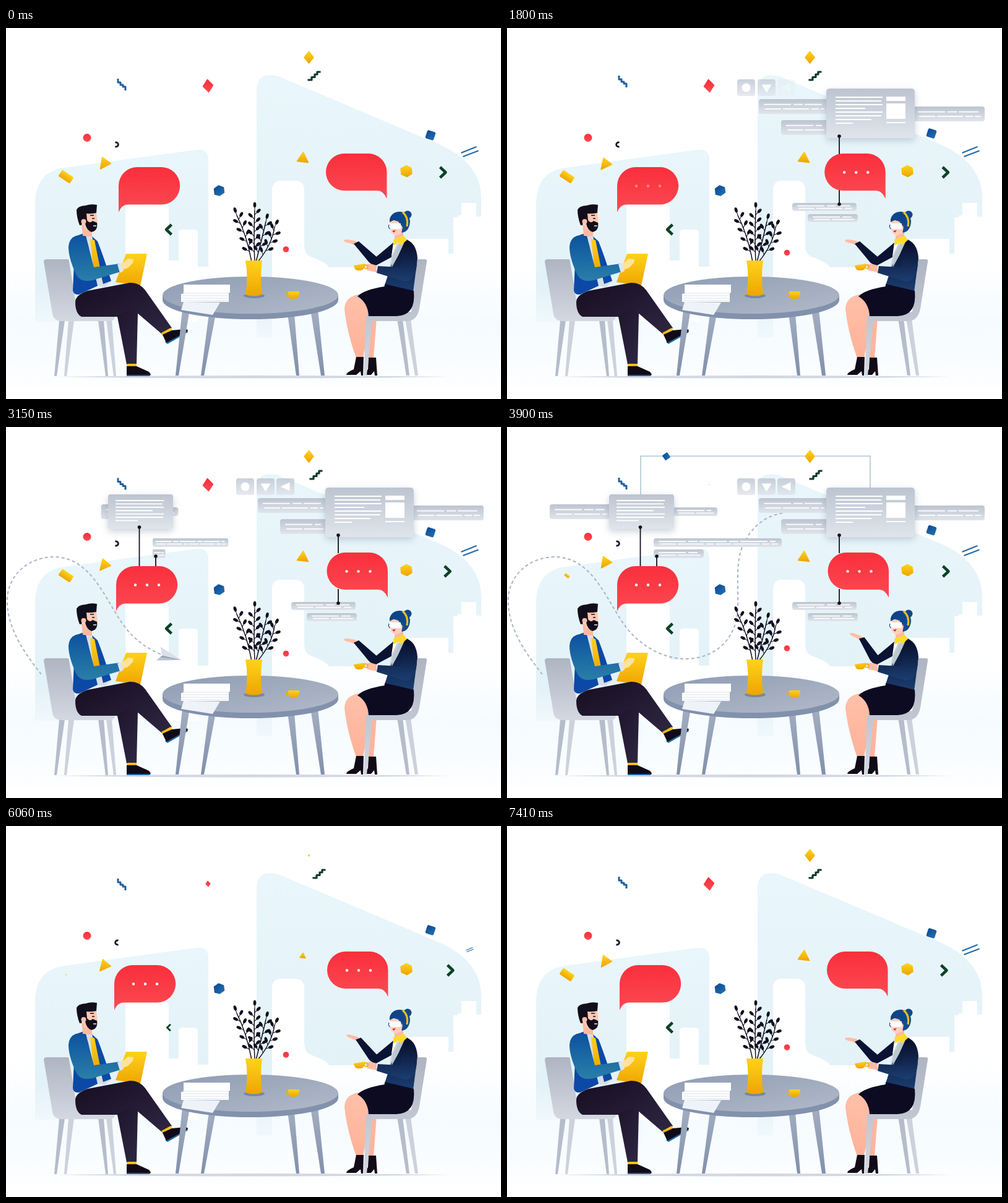
Animation of 800 by 600 pixels, one loop 7.44 s. Source, as an HTML page:

```html
<!DOCTYPE html>
<html lang="en">
<head>
<meta charset="utf-8">
<title>Conversation at a table</title>
<style>
html, body { margin: 0; width: 100%; height: 100%; overflow: hidden; background: #fff; }
svg { display: block; width: 800px; height: 600px; }
.ui { filter: drop-shadow(0 4px 6px rgba(110, 125, 150, .35)); }
</style>
</head>
<body>
<svg id="stage" viewBox="0 0 800 600">
<defs>
  <linearGradient id="sky" x1="0" y1="0" x2="0" y2="1"><stop stop-color="#e9f6fb"/><stop offset=".8" stop-color="#e3f2f8"/><stop offset="1" stop-color="#f0f8fb"/></linearGradient>
  <linearGradient id="haze" x1="0" y1="0" x2="0" y2="1"><stop stop-color="#fff"/><stop offset=".5" stop-color="#f5fbfe"/><stop offset="1" stop-color="#fdfeff"/></linearGradient>
  <linearGradient id="red" x1="0" y1="0" x2="0" y2="1"><stop stop-color="#f92f3c"/><stop offset="1" stop-color="#fb4a52"/></linearGradient>
  <linearGradient id="gold" x1="0" y1="0" x2="0" y2="1"><stop stop-color="#ffd21c"/><stop offset="1" stop-color="#eea500"/></linearGradient>
  <linearGradient id="blue" x1="0" y1="0" x2="1" y2="1"><stop stop-color="#0d4795"/><stop offset="1" stop-color="#2472ad"/></linearGradient>
  <linearGradient id="sleeve" x1="0" y1="0" x2="0" y2="1"><stop stop-color="#0d529f"/><stop offset="1" stop-color="#297fa8"/></linearGradient>
  <linearGradient id="navy" x1="0" y1="0" x2="0" y2="1"><stop stop-color="#080d29"/><stop offset="1" stop-color="#1b3e72"/></linearGradient>
  <linearGradient id="pants" x1="0" y1="0" x2="1" y2="1"><stop stop-color="#170d20"/><stop offset="1" stop-color="#2e2743"/></linearGradient>
  <linearGradient id="seat" x1="0" y1="0" x2="0" y2="1"><stop stop-color="#aeb4c2"/><stop offset="1" stop-color="#d3d8e1"/></linearGradient>
  <linearGradient id="top" x1="0" y1="0" x2="1" y2="1"><stop stop-color="#8f9cb3"/><stop offset="1" stop-color="#b1bac9"/></linearGradient>
  <linearGradient id="leg" x1="0" y1="0" x2="0" y2="1"><stop stop-color="#a3aec1"/><stop offset="1" stop-color="#8190ac"/></linearGradient>
  <linearGradient id="card" x1="0" y1="0" x2="0" y2="1"><stop stop-color="#bcc4d0"/><stop offset="1" stop-color="#e0e5ec"/></linearGradient>
  <linearGradient id="skin" x1="0" y1="0" x2="0" y2="1"><stop stop-color="#ffc0aa"/><stop offset="1" stop-color="#ffb298"/></linearGradient>
  <mask id="reveal" maskUnits="userSpaceOnUse" x="-20" y="0" width="840" height="600"><path id="shown" fill="none" stroke="#fff" stroke-width="8"/></mask>
</defs>

<g id="city">
  <rect x="0" y="380" width="800" height="200" fill="url(#haze)"/>
  <path fill="url(#sky)" d="M47 475V285Q47 232 95 226L308 197Q327 195 327 213V386H215V475Z"/>
  <path fill="#fff" d="M193 475V292Q193 284 201 284H255Q263 284 263 292V376H279V332Q279 326 285 326H304Q310 326 310 332V475Z"/>
  <path fill="url(#sky)" d="M405 500V98Q407 70 440 78L690 184Q768 214 768 275V305H760V283H736V303H730V306H723V365H715V341H640V387H522Q520 380 490 369Q482 364 482 350V262Q482 247 467 247H445Q430 247 430 262V500Z"/>
</g>

<g id="trail">
  <path id="route" mask="url(#reveal)" fill="none" stroke="#aab3c6" stroke-width="2" stroke-dasharray="5 4" d="M57 400C30 365 0 325 2 275C6 235 40 210 78 210C148 212 165 300 205 338C230 362 260 375 290 375C335 374 370 345 373 295C374 260 370 225 378 200C388 170 410 148 437 141C500 126 600 113 660 108.500L703 107"/>
  <g id="plane"><path fill="#d9dfe8" d="M20 0L-18-12L-12 1Z"/><path fill="#b9c2d0" d="M20 0L-12 1L-19 11Z"/><path fill="#94a1b6" d="M20 0L-12 1L-14 4Z"/></g>
</g>

<path id="wire" fill="none" stroke="#aec8d2" stroke-width="1.6" pathLength="1" d="M587 98V47H216V109"/>
<g id="panels"></g>
<g id="bits"></g>

<g id="sayL">
  <path fill="url(#red)" d="M182 298V255A30 30 0 0 1 212 225H251A30 30 0 0 1 251 285.500H197Q187 285.500 182 298Z"/>
  <g id="dotsL" fill="#fff"><circle cx="213" cy="255.500" r="2.200"/><circle cx="232" cy="255.500" r="2.200"/><circle cx="251" cy="255.500" r="2.200"/></g>
</g>
<g id="sayR">
  <path fill="url(#red)" d="M615.500 276V233A30 30 0 0 0 585.500 203H547A30 30 0 0 0 547 263H600Q610 263 615.500 276Z"/>
  <g id="dotsR" fill="#fff"><circle cx="549" cy="233.500" r="2.200"/><circle cx="568" cy="233.500" r="2.200"/><circle cx="587" cy="233.500" r="2.200"/></g>
</g>

<path d="M78 564Q400 560 720 564Q400 569 78 564Z" fill="#d3d7e3"/>

<g id="chairL">
  <path fill="#b5bdcb" d="M86 473H95L82 563H78ZM149 473H158L165 563H161Z"/>
  <path fill="#cbd2dc" d="M101 473H110L98 563H94ZM162 473H171L178 563H174Z"/>
  <path fill="url(#seat)" d="M61 378Q61 374 66 374L99 374Q102 374 102 378L114 452L176 466Q176 474 166 474L90 474Q77 474 75 462Z"/>
</g>

<g id="man">
  <path fill="url(#pants)" d="M148 466L180 467L195 544H211L213 462Q212 444 190 442Z"/>
  <path fill="#d9dde6" d="M130 336L143 341L170 410L160 419L140 415Z"/>
  <path fill="#0c49a6" d="M112 337L128 331L148 417L118 431Q109 432 108 424Z"/>
  <path fill="#0c49a6" d="M139 337L148 345Q158 370 170 409L157 414Z"/>
  <path fill="url(#gold)" d="M136 341L143 343L152 388L147 395L141 386Z"/>
  <path fill="url(#gold)" d="M194 365H228L217 417L177 411Z"/>
  <path fill="url(#pants)" d="M112 443Q112 432 132 425L200 412Q215 411 225 424L268 485L252 495L204 454L176 467L122 467Q112 462 112 443Z"/>
  <path fill="url(#sleeve)" d="M113 336Q130 332 134 356L142 387L184 381L189 393L140 408Q121 412 114 400Q101 373 101 354Q102 340 113 336Z"/>
  <path fill="#dfe5ee" d="M180 382L187 380L190 393L184 396Z"/>
  <path fill="#ffe29b" d="M186 382L197 373L206 374L205 380L197 388L189 391Z"/>
  <path fill="#ffb9a2" d="M122 317L139 325L139 338L124 336Z"/>
  <path fill="#ffc8b2" d="M122 298H146L148 316L140 330L127 325Z"/>
  <path fill="#120d1b" d="M114 294Q116 288 129 287Q137 284 147 286L146 299Q137 301 130 300L131 311Q135 317 140 312L147 315Q149 328 138 330Q130 327 128 316L124 309L122 319H119Q114 306 114 294Z"/>
  <circle cx="125.500" cy="313" r="4" fill="#ffc1aa"/>
  <path fill="none" stroke="#120d1b" stroke-width="1.300" d="M136 303L142 303M139 308H143"/>
  <path fill="none" stroke="#fff" stroke-width="1.400" d="M141 320H146"/>
  <path fill="url(#gold)" d="M196 543H211V548H195Z"/>
  <path fill="#110b17" d="M195 547H211L231 556Q235 560 233 562H195Z"/><path fill="#1b66a7" d="M195 561H232V563H195Z"/>
  <g id="foot">
    <path fill="url(#gold)" d="M251 493L266 485L270 490L254 498Z"/>
    <path fill="#1b66a7" d="M257 508L261 511L294 492L292 489Z"/>
    <path fill="#110b17" d="M253 496L268 489L289 487Q294 487 294 490L259 509Z"/>
  </g>
</g>

<g id="table">
  <path fill="url(#leg)" d="M285 455H297L279 562H274ZM328 462H339L320 562H315ZM455 462H466L474 562H469ZM492 455H504L515 562H509Z"/>
  <path fill="#8291ac" d="M253 432H537V440A142 31 0 0 1 253 440Z"/>
  <ellipse cx="395" cy="432" rx="142" ry="30" fill="url(#top)"/>
  <path fill="#edf3f8" d="M287 443L346 444L334 464L283 456Z"/>
  <path fill="#fff" d="M287 415H362V428H360V443H283V430H287Z"/>
  <path fill="none" stroke="#d9e0ea" d="M285 429H361M285 433H359M285 437H359M285 441H359"/>
  <ellipse cx="401" cy="433" rx="17" ry="4" fill="#7888a3"/>
  <g id="twigs" fill="#110e20" stroke="#110e20"></g>
  <path fill="url(#gold)" d="M387 376H414Q410 402 414 431Q401 436 387 431Q392 402 387 376Z"/>
  <circle cx="456" cy="431" r="3" fill="none" stroke="#f1b000" stroke-width="1.500"/>
  <path fill="url(#gold)" d="M456 426H474Q474 437 468 438H461Q456 437 456 426Z"/>
</g>

<g id="woman">
  <path fill="#b5bdcb" d="M632 470H641L652 562H647Z"/>
  <path fill="#cbd2dc" d="M645 470H654L666 562H661Z"/>
  <path fill="#ffb59d" d="M564 438L600 455L594 534H581Q578 495 562 462Z"/>
  <path fill="url(#skin)" d="M575 430Q547 433 547 455Q551 492 566 534H577Q585 490 584 461Z"/>
  <path id="boot" fill="#110b17" d="M566 532H578L577 562H574L573 555L566 561H550Q550 557 562 552Z"/>
  <path fill="#110b17" d="M586 533H598L600 562H596L595 555L590 561H580Q580 557 585 552Z"/>
  <path fill="url(#seat)" d="M664 374H677Q681 374 680 378L668 454Q664 474 648 474H592L583 562H578L582 466L655 459Z"/>
  <g id="arm">
    <path fill="#ffbda6" d="M546 344Q546 342 552 342L564 344L571 348L566 352L556 348Q548 347 546 344Z"/>
    <path fill="#0a1333" d="M562 349L570 345L600 371L598 384Q590 383 586 378Z"/>
  </g>
  <path fill="#0a1333" d="M626 347L596 372Q590 381 598 384L626 369Z"/>
  <path fill="#ffbaa3" d="M628 328H642V349L628 346Z"/>
  <path fill="#ccd4dc" d="M627 347L640 350L628 389L620 386Z"/>
  <path fill="#fff" d="M626 347L634 344L623 369Z"/>
  <path fill="url(#navy)" d="M643 341Q663 345 665 372L658 428L611 419L622 385Z"/>
  <path fill="#0c0b22" d="M612 414L659 425Q663 465 631 466H586Q585 444 568 434Q579 423 612 418Z"/>
  <path fill="#bcc7d0" d="M638 344L644 346L634 368L623 388L625 369Z"/>
  <path fill="#ffdb2a" d="M626 342L643 336L648 343L638 351L634 347L627 352Z"/>
  <path fill="url(#navy)" d="M646 346Q663 351 664 377Q664 410 644 410L599 396L601 385L637 387Z"/>
  <path fill="#ffbca5" d="M599 384L588 381L581 384L584 392L599 395Z"/>
  <path fill="url(#gold)" d="M562 384L580 381Q581 390 574 392H568Q563 391 562 384Z"/>
  <circle cx="582" cy="386" r="3" fill="none" stroke="#f1b000" stroke-width="1.300"/>
  <circle cx="649" cy="302" r="6.500" fill="#10488e"/>
  <path fill="#11498f" d="M620 310Q623 297 637 297Q652 299 653 313Q652 329 640 331L629 318Z"/>
  <path fill="#ffd0be" d="M621 309L634 313L641 322L639 332L629 336L622 331Z"/>
  <path fill="#0f438a" d="M620 314Q619 300 636 298Q648 304 641 320Q640 310 630 309Z"/>
  <path fill="none" stroke="#eebd19" stroke-width="3" d="M641 298Q651 306 648 321"/>
  <path fill="#fff" d="M619 316H638V325H619Z"/>
  <path fill="none" stroke="#294f89" stroke-width="1.300" d="M619 318Q617 323 621 325M641 316Q640 324 645 326"/>
  <path fill="#e22136" d="M624 328L630 327L627 331Z"/>
</g>
</svg>

<script>
const LOOP = 7440;
const $ = id => document.getElementById(id);
const ease = u => (1 - Math.cos(Math.PI * u)) / 2;
const ramp = (t, a, b) => Math.min(1, Math.max(0, (t - a) / (b - a)));
const place = (el, x, y, scale = 1, turn = 0) =>
  el.setAttribute('transform', `translate(${x} ${y}) rotate(${turn}) scale(${scale})`);

// Eased value from a flat list of time, value pairs.
function track(keys, t) {
  for (let i = 0; i < keys.length - 2; i += 2) {
    if (t <= keys[i + 2]) return keys[i + 1] + (keys[i + 3] - keys[i + 1]) * ease(ramp(t, keys[i], keys[i + 2]));
  }
  return keys[keys.length - 1];
}
// Rises over inA..inB and falls over outA..outB.
const show = (t, inA, inB, outA, outB) => ease(ramp(t, inA, inB)) * (1 - ease(ramp(t, outA, outB)));

// Confetti: centre, drawing, then optional period with scale, dx, dy and turn tracks.
const hex = 'M0-9L8-5L9 4L1 9L-8 5L-9-4Z';
const fill = (d, paint) => `<path d="${d}" fill="${paint}" stroke="${paint}" stroke-width="1.500" stroke-linejoin="round"/>`;
const line = (d, color, width) => `<path d="${d}" fill="none" stroke="${color}" stroke-width="${width}" stroke-linejoin="round"/>`;
const diamond = 'M0-9.500L7.500 0L0 9.500L-7.500 0Z';
const gold = 'url(#gold)', blue = 'url(#blue)', green = '#0c4226';
const bits = [
  { x: 489.5, y: 47.5, art: fill(diamond, gold), period: 3720, scale: [0, 1, 2150, 1, 2400, .08, 2450, 0, 2550, 0, 2850, 1] },
  { x: 257.5, y: 47.5, art: `<rect x="-6.500" y="-6.500" width="13" height="13" rx="1.500" transform="rotate(-35)" fill="${blue}"/>`, period: 3720, scale: [0, 0, 270, 1, 1140, 1, 1330, 0] },
  { x: 326.5, y: 93.5, art: fill('M-1-10L8-1L1 10L-8 1Z', 'url(#red)'), period: 2480, scale: [0, 1, 1060, 1, 1140, 0, 1370, 0, 1700, 1] },
  { x: 131, y: 177.5, art: '<circle r="6.500" fill="url(#red)"/>' },
  { x: 179, y: 188.5, art: line('M2.500-3.200A3.500 3.500 0 1 0 2.500 3.200', '#15172f', 2.8), turn: [0, 180, 950, 180, 1140, 235, 1350, 360, 2500, 360, 2800, 540, 5050, 540, 5500, 720, 6200, 720, 6800, 900] },
  { x: 160.5, y: 219, art: fill('M-5-10L9 0L-8 9Z', gold), dy: [0, 0, 1140, -8, 2400, 9, 3900, 0, 4950, 6, 6060, 7, 7410, 0], turn: [0, 0, 1140, -3, 2400, 8, 3900, 0, 4950, 4, 6060, 5, 7410, 0] },
  { x: 97, y: 240.5, art: `<rect x="-11" y="-6" width="22" height="12" rx="1.500" transform="rotate(34)" fill="${gold}"/>`, scale: [0, 1, 900, 1, 1290, 0, 1450, 0, 1750, 1, 3500, 1, 3700, 0, 3790, 0, 4050, 1, 5880, 1, 6110, 0, 6250, 0, 6550, 1] },
  { x: 263, y: 326, art: line('M4.500-8L-4 0L4.500 8', green, 4.5), period: 3720, scale: [0, 1, 2240, 1, 2490, 0, 2600, 0, 2900, 1] },
  { x: 344.5, y: 263, art: fill('M-1-8L7-5L8 3L1 8L-7 6L-8-3Z', blue), scale: [0, 1, 2280, 1, 2540, 0, 2650, 0, 2920, 1] },
  { x: 452.5, y: 358, art: '<circle r="4.800" fill="url(#red)"/>', dy: [0, 0, 1140, -8, 2400, 17, 3900, 0, 4950, 12, 6060, 12, 7410, 0] },
  { x: 479.5, y: 209.5, art: fill('M1-9L9 8L-9 6Z', gold), period: 3720, scale: [0, 1, 2150, 1, 2560, 0, 2700, 0, 3000, 1] },
  { x: 498, y: 77.5, art: line('M-10.500 6.500H-4V2H1V-2.500H5V-6.500H10.500', '#0d3b2e', 3.2), dx: [0, 0, 1140, -6, 2400, 5, 3900, 1, 4950, 5, 6060, 8, 7410, 0] },
  { x: 187, y: 91, art: line('M-6-9V-3H-2V1H2V4H6V10', '#20609f', 3), dy: [0, 0, 1140, -12, 2400, 1, 3900, 0, 4950, 2, 6060, 3, 7410, 0] },
  { x: 686, y: 173.5, art: `<rect x="-7" y="-7" width="14" height="14" rx="2.500" transform="rotate(18)" fill="${blue}"/>`, dy: [0, 0, 1140, -6.500, 2400, 0, 3900, -6.500, 4950, 0, 6060, -5, 7410, 0] },
  { x: 749.5, y: 200, art: line('M-14 2L11-8M-11 8L14-1.500', '#266ca8', 2.4), period: 3720, scale: [0, 1, 2180, 1, 2480, 0, 2620, 0, 2900, 1] },
  { x: 647, y: 231.5, art: fill(hex, gold), scale: [0, 1, 2080, 1, 2340, 0, 2450, 0, 2750, 1] },
  { x: 706, y: 233.5, art: line('M-4.500-8.500L4.500 0L-4.500 8.500', green, 4.5), dx: [0, 0, 1140, -8, 2400, 11.500, 3900, 3, 4950, 7, 6060, 12, 7410, 0] }
];
$('bits').innerHTML = bits.map(b => `<g>${b.art}</g>`).join('');
bits.forEach((b, i) => { b.el = $('bits').children[i]; });

// Panels with side bars that slide out from underneath.
const bar = (id, x, y, w, h) => `<g id="${id}"><rect x="${x}" y="${y}" width="${w}" height="${h}" rx="4" fill="url(#card)"/>` +
  [.36, .66].map((f, i) => `<path d="M${x + 8 + i * 2} ${y + h * f}H${x + w - 10 + i * 4}" stroke="#fff" stroke-width="1.700" stroke-dasharray="${i ? '26 3 42 4 12 3' : '44 4 15 3'}"/>`).join('') + '</g>';
const textLines = (x, y, gap, widths) => widths.map((w, i) => `<path d="M${x} ${y + i * gap}h${w}" stroke="#fff" stroke-width="1.900"/>`).join('');
const icon = (x, mark) => `<g><rect x="${x}" y="83" width="29" height="27" rx="4" fill="url(#card)" opacity=".8"/><g transform="translate(${x + 14.5} 96.500)" fill="#fff">${mark}</g></g>`;
const stem = (x, a, b, ends) => `<path d="M${x} ${a}V${b}" stroke="#13131c" stroke-width="1.800"/><circle cx="${x}" cy="${ends}" r="2.800" fill="#13131c"/>`;

$('panels').innerHTML =
  '<g id="icons">' + icon(372, '<circle r="7"/>') + icon(405, '<path d="M-8-5H8L0 8Z"/>') + icon(437, '<path d="M7-7V7L-8 0Z"/>') + '</g>' +
  '<g id="barsR">' + bar('r1', 407, 115, 112, 24) + bar('r2', 443, 149, 76, 24) + bar('r3', 656, 127, 116, 24) + '</g>' +
  '<g id="cardR" class="ui"><rect x="516" y="98" width="143" height="80" rx="5" fill="url(#card)"/>' +
  textLines(531, 112, 6, [76, 74, 76, 48, 76, 74, 58, 28]) +
  '<path d="M613 111H644V118H613ZM613 122H644V147H613Z" fill="#fff"/>' + textLines(613, 153, 5, [31]) + '</g>' +
  '<g id="barsL">' + bar('l1', 69, 125, 99, 24) + bar('l2', 267, 130, 73, 14) + '</g>' +
  '<g id="cardL" class="ui"><rect x="165" y="109" width="105" height="56" rx="4" fill="url(#card)"/>' +
  textLines(177, 119, 5.4, [78, 76, 78, 60, 78, 77, 36]) + '</g>' +
  '<g id="linkR">' + stem(537, 175, 204, 175) + stem(537, 262, 285, 285) + '</g>' +
  '<g id="linkL">' + stem(215.5, 162, 226, 162) + stem(242, 209, 226, 209) + '</g>' +
  '<g id="notesR">' + bar('n1', 461, 283, 104, 13) + bar('n2', 486, 301, 81, 13) + '</g>' +
  '<g id="notesL">' + bar('n3', 237, 180, 207, 14) + bar('n4', 237, 198, 81, 14) + '</g>';
$('panels').append($('linkL'), $('linkR'));

// Twigs: quadratic stems with leaves on alternate sides.
function twig(x0, y0, cx, cy, x1, y1, count) {
  let out = `<path d="M${x0} ${y0}Q${cx} ${cy} ${x1} ${y1}" fill="none" stroke-width="1.500"/>`;
  for (let i = 0; i <= count; i++) {
    const u = .2 + .8 * i / count, v = 1 - u, side = i === count ? 0 : i % 2 ? 1 : -1;
    const x = v * v * x0 + 2 * u * v * cx + u * u * x1, y = v * v * y0 + 2 * u * v * cy + u * u * y1;
    const lean = Math.atan2(x1 - x0, y0 - y1) * 57.3 + side * 45;
    out += `<g transform="translate(${x} ${y}) rotate(${lean})"><path d="M0 0V-6" fill="none"/><ellipse cy="-9" rx="2.400" ry="4.300" stroke="none"/></g>`;
  }
  return out;
}
$('twigs').innerHTML = twig(402, 378, 400, 340, 402, 295, 10) + twig(397, 378, 389, 335, 373, 303, 8) +
  twig(407, 378, 430, 350, 434, 322, 7) + twig(404, 378, 414, 340, 420, 313, 6);

const route = $('route'), shown = $('shown');
shown.setAttribute('d', route.getAttribute('d'));
const length = route.getTotalLength();

function drawPlane(t) {
  const head = length * ramp(t, 2240, 4240);
  const tail = t < 4950 ? (length - 43) * ramp(t, 4510, 4930) : length - 43 + 43 * ramp(t, 4950, 5080);
  shown.setAttribute('stroke-dasharray', `0 ${tail} ${Math.max(0, head - tail)} ${length * 2}`);
  $('trail').style.display = head > 0 && tail < length ? '' : 'none';
  const p = route.getPointAtLength(head), q = route.getPointAtLength(Math.max(0, head - 3));
  const heading = head ? Math.atan2(p.y - q.y, p.x - q.x) * 57.3 : -125;
  place($('plane'), p.x, p.y, show(t, 2180, 2320, 4180, 4330), heading);
}

function grow(id, x, y, k, flat) {
  const el = $(id), sy = flat ? 1 : k;
  el.style.display = k > .002 ? '' : 'none';
  el.setAttribute('transform', `translate(${x} ${y}) scale(${k} ${sy}) translate(${-x} ${-y})`);
}
function slide(id, hidden, k) {
  $(id).setAttribute('transform', `translate(${hidden * (1 - k)} 0)`);
}

function drawPanels(t) {
  const right = show(t, 420, 800, 5480, 5800);
  grow('cardR', 587, 138, right);
  $('barsR').style.display = t > 790 && t < 5490 ? '' : 'none';
  slide('r1', 109, show(t, 800, 1225, 5290, 5490));
  slide('r2', 73, show(t, 850, 1330, 5290, 5490));
  slide('r3', -113, show(t, 800, 1225, 5290, 5490));
  grow('linkR', 537, 233, show(t, 380, 700, 5450, 5700));
  grow('n1', 537, 289, show(t, 650, 1000, 5350, 5600), true);
  grow('n2', 537, 307, show(t, 750, 1100, 5350, 5600), true);
  [...$('icons').children].forEach((el, i) => {
    el.style.opacity = show(t, 1500 + i * 120, 1750 + i * 120, 5200 + i * 60, 5400 + i * 60);
  });

  grow('cardL', 217, 137, show(t, 2700, 3050, 5160, 5450));
  $('barsL').style.display = t > 3040 && t < 5170 ? '' : 'none';
  slide('l1', 96, show(t, 3050, 3500, 4840, 5170));
  slide('l2', -70, show(t, 3050, 3500, 4770, 5170));
  grow('linkL', 228, 226, show(t, 2500, 2800, 5150, 5400));
  grow('n3', 237, 187, show(t, 2900, 3350, 5050, 5350), true);
  grow('n4', 237, 205, show(t, 3000, 3450, 5050, 5350), true);

  const drawn = show(t, 3200, 3750, 5060, 5400);
  $('wire').style.display = drawn > .002 ? '' : 'none';
  $('wire').setAttribute('stroke-dasharray', `${drawn} 2`);
}

function draw(t) {
  for (const b of bits) {
    const u = t % (b.period || LOOP);
    const at = (keys, rest) => keys ? track(keys, u) : rest;
    place(b.el, b.x + at(b.dx, 0), b.y + at(b.dy, 0), at(b.scale, 1), at(b.turn, 0));
  }
  place($('sayL'), track([0, 0, 1140, -4, 2400, -4, 3900, -4, 4950, -1, 6060, -7, 7410, 0], t), 0);
  place($('sayR'), track([0, 0, 1140, -10, 2400, 1.5, 3900, 1.5, 4950, 0, 6060, 2, 7410, 0], t), 0);
  $('dotsL').style.opacity = show(t, 1700, 1950, 6600, 6850);
  $('dotsR').style.opacity = show(t, 300, 550, 6600, 6850);
  const lift = track([0, 0, 350, 0, 850, 14, 1140, 13, 1700, 0, 3250, 0, 3700, 14, 3900, 12, 4500, 0, 5750, 0, 6060, 6, 6450, 14, 7200, 0], t);
  $('arm').setAttribute('transform', `rotate(${lift} 597 378)`);
  $('foot').setAttribute('transform', `rotate(${track([0, 0, 4550, 0, 4950, -9, 5400, 0], t)} 259 491)`);
  drawPanels(t);
  drawPlane(t);
}

const start = performance.now();
function tick() {
  draw((performance.now() - start) % LOOP);
  requestAnimationFrame(tick);
}
tick();
</script>
</body>
</html>
```
